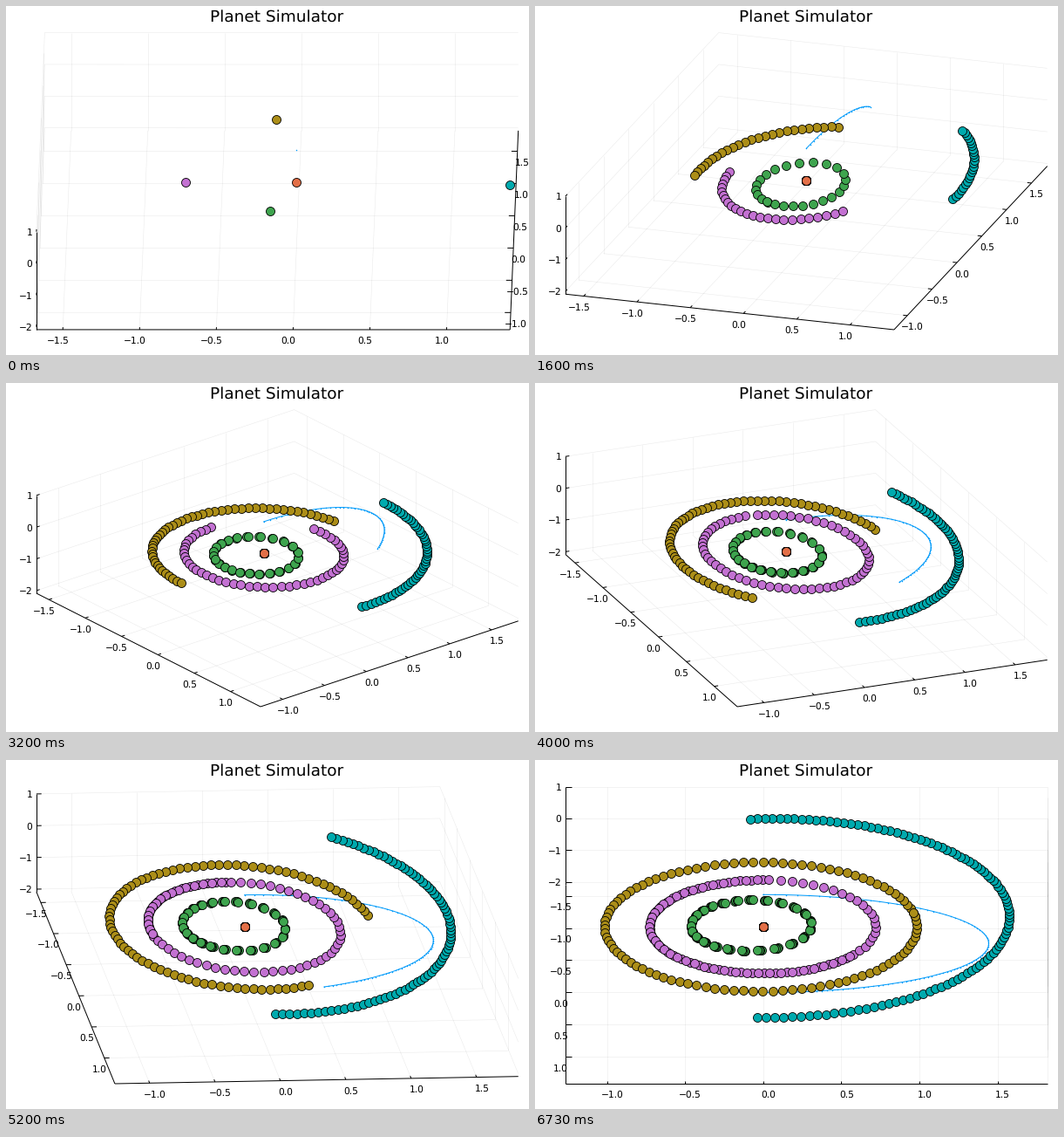
Write a matplotlib script that moves like this. It is 600x400 px and loops after 6790 ms.

```python
import numpy as np
import matplotlib.pyplot as plt
from matplotlib.animation import FuncAnimation
from matplotlib.collections import LineCollection

LOOP_MS, FRAMES = 6790, 102
PX = 0.72  # one pixel in points at 100 dpi

# Plot box in pixels, and how its height is split between floor and z axis
LEFT, RIGHT, TOP, BOTTOM = 34.9, 587.7, 30.6, 371.0
FLOOR = 228.2
RISE = BOTTOM - TOP - FLOOR

# Equal data cube: lower corner and side (AU)
LOW = np.array([-1.672, -1.266, -2.085])
SIDE = 3.085
HIGH = LOW + SIDE
TICKS = [np.arange(-1.5, 1.1, 0.5), np.arange(-1, 1.6, 0.5), np.arange(-2, 2)]
TICK_LEN = 0.0125 * SIDE

# Orbital elements: a, e, inclination, mean longitude, perihelion, node
PLANETS = [
    ("#3ea44e", 0.387099, 0.205636, 7.00498, 252.25032, 77.45780, 48.33077),
    ("#c371d2", 0.723336, 0.006777, 0.0, 181.97910, 131.60247, 0.0),
    ("#ac8e18", 1.000003, 0.016711, 0.0, 100.46457, 102.93768, 0.0),
    ("#00aaae", 1.523710, 0.093394, 1.84969, -4.55343, -23.94363, 49.55954),
]
DT = 0.01                  # years per step
EPOCH = -1.5 / 365.25      # start, relative to J2000
COMET_V = 0.02 * 365.25    # AU per year at (0, 0, 1)


def kepler(a, e, mean):
    """Position in the orbit plane, perihelion on the first axis."""
    E = mean + e * np.sin(mean)
    for _ in range(8):
        E = E - (E - e * np.sin(E) - mean) / (1 - e * np.cos(E))
    return a * (np.cos(E) - e), a * np.sqrt(1 - e * e) * np.sin(E)


def planet_path(a, e, *angles):
    inc, lon, peri, node = np.radians(angles)
    t = EPOCH + DT * np.arange(FRAMES)
    p, q = kepler(a, e, lon - peri + 2 * np.pi * a ** -1.5 * t)
    w = peri - node
    p, q = p * np.cos(w) - q * np.sin(w), p * np.sin(w) + q * np.cos(w)
    flat = q * np.cos(inc)
    return np.column_stack([p * np.cos(node) - flat * np.sin(node),
                            p * np.sin(node) + flat * np.cos(node),
                            q * np.sin(inc)])


def comet_path():
    e = COMET_V ** 2 / (4 * np.pi ** 2) - 1
    a = 1 / (1 - e)
    z, y = kepler(a, e, 2 * np.pi * a ** -1.5 * DT * np.arange(FRAMES))
    return np.column_stack([0 * y, y, z])


def project(points, turn):
    """Data points to pixels for a camera turned by the given degrees."""
    u, v, w = np.moveaxis((np.asarray(points, float) - LOW) / SIDE, -1, 0)
    c, s = np.cos(np.radians(turn)), np.sin(np.radians(turn))
    x = LEFT + (RIGHT - LEFT) * (c * u + s * v) / (c + s)
    y = BOTTOM - FLOOR * (s * s * (1 - u) + c * c * v) - RISE * w
    return np.stack([x, y], axis=-1)


def build_frame():
    """Grid segments, axis and tick segments, and label anchors."""
    (x0, y0, z0), (x1, y1, z1) = LOW, HIGH
    grid = []
    axes = [[(x0, y0, z0), (x1, y0, z0)],
            [(x1, y0, z0), (x1, y1, z0)],
            [(x0, y0, z0), (x0, y0, z1)]]
    labels = []
    for x in TICKS[0]:
        grid += [[(x, y0, z0), (x, y1, z0)], [(x, y1, z0), (x, y1, z1)]]
        axes.append([(x, y0, z0), (x, y0 + TICK_LEN, z0)])
        labels.append(((x, y0, z0), f"{x:.1f}", -5.6, 16.3, "center"))
    for y in TICKS[1]:
        grid += [[(x0, y, z0), (x1, y, z0)], [(x0, y, z0), (x0, y, z1)]]
        axes.append([(x1, y, z0), (x1 - TICK_LEN, y, z0)])
        labels.append(((x1, y, z0), f"{y:.1f}", 6, 16.3, "center"))
    for z in TICKS[2]:
        grid += [[(x0, y0, z), (x0, y1, z)], [(x0, y1, z), (x1, y1, z)]]
        axes.append([(x0, y0, z), (x0, y0 + TICK_LEN, z)])
        labels.append(((x0, y0, z), f"{z:d}", -4.8, 4.2, "right"))
    return np.array(grid), np.array(axes), labels


plt.rcParams.update({"font.family": "DejaVu Sans", "text.hinting": "none",
                     "text.hinting_factor": 8})
fig = plt.figure(figsize=(6, 4), dpi=100, facecolor="white")
ax = fig.add_axes([0, 0, 1, 1])
ax.set(xlim=(0, 600), ylim=(400, 0))
ax.axis("off")

grid, axes, labels = build_frame()
grid_art = LineCollection([], colors="black", alpha=0.08, linewidths=0.6 * PX)
axes_art = LineCollection([], colors="black", linewidths=PX)
ax.add_collection(grid_art)
ax.add_collection(axes_art)
ax.text(310.8, 18, "Planet Simulator", fontsize=18.5 * PX, ha="center")
texts = [ax.text(0, 0, s.replace("-", "\u2212"), fontsize=10.6 * PX, ha=ha)
         for _, s, _, _, ha in labels]


def trail(color, path, zorder):
    art, = ax.plot([], [], "o", ms=10 * PX, mfc=color, mec="black",
                   mew=0.85 * PX, zorder=zorder, snap=False)
    return art, path


comet, = ax.plot([], [], "-o", color="#009afa", lw=PX, ms=1.5 * PX,
                 mew=0, zorder=3)
trails = [(comet, comet_path()),
          trail("#e36f47", np.zeros((FRAMES, 3)), 4)]
trails += [trail(color, planet_path(*elements), 5 + i)
           for i, (color, *elements) in enumerate(PLANETS)]


def update(k):
    turn = min(k + 1, 90)
    grid_art.set_segments(project(grid, turn))
    axes_art.set_segments(project(axes, turn))
    for text, (anchor, _, dx, dy, _) in zip(texts, labels):
        text.set_position(project(anchor, turn) + (dx, dy))
    for art, path in trails:
        art.set_data(*project(path[:k + 1], turn).T)


anim = FuncAnimation(fig, update, frames=FRAMES, interval=LOOP_MS / FRAMES,
                     init_func=lambda: update(0), repeat=True, repeat_delay=0)
plt.show()
```
